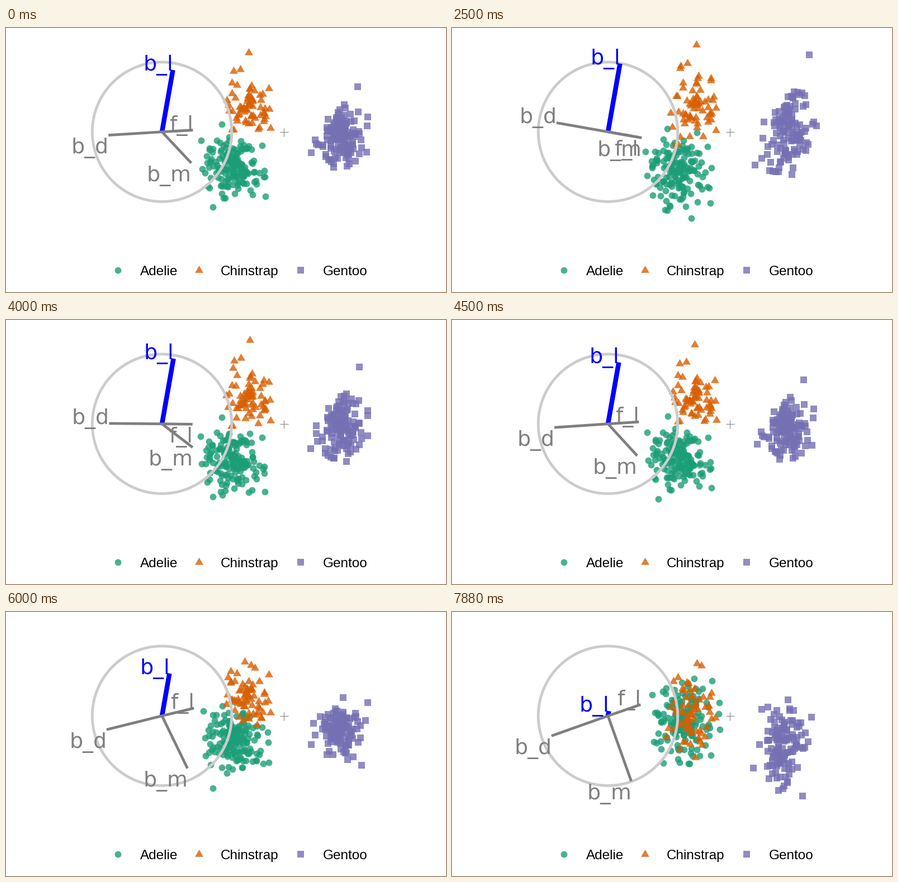
Animation of 787 by 472 pixels, one loop 8 s. Source, as a matplotlib script:

```python
import numpy as np
import matplotlib.pyplot as plt
from matplotlib.animation import FuncAnimation

W, H, DPI = 787, 472, 64
PX = 72 / DPI               # points per pixel
LOOP, STEP = 8000, 20       # ms
GREY = "#7f7f7f"

# Standardised bill length, bill depth, flipper length and body mass:
# a cloud around the mean, sharing one correlation, plus two far birds
SPREAD = np.array([.54, .56, .47, .57])
SPECIES = [
    dict(name="Adelie", marker="o", size=11.8, color="#1b9e77",
         n=149, corr=.45, mean=[-.94, .61, -.78, -.62],
         far=[[-2.17, -.84, -.92, -1.44], [-1.71, 2, -.21, .25]],
         key_x=200, text_x=239.5),
    dict(name="Chinstrap", marker=(3, 0, 0), size=17.2, color="#d95f02",
         n=66, corr=.57, mean=[.90, .64, -.36, -.58],
         far=[[2.58, .33, -1.42, -.63], [.55, -.28, -.63, -1.87]],
         key_x=345, text_x=384),
    dict(name="Gentoo", marker="s", size=11.4, color="#7570b3",
         n=121, corr=.68, mean=[.66, -1.10, 1.16, 1.09],
         far=[[2.87, -.08, 2.07, 2.30], [.97, -.99, 1.43, 2.62]],
         key_x=527.2, text_x=567),
]
AXES = ["b_l", "b_d", "f_l", "b_m"]
HUB, RADIUS = np.array([279, 185.7]), 124
ORIGIN, SCALE = np.array([480.6, 207.4]), np.array([61.6, -64.7])

# Radial tour: bill length turns out of the plane along one direction
PHI = np.radians(80)
ALONG = np.array([np.cos(PHI), np.sin(PHI)])
ACROSS = np.array([np.sin(PHI), -np.cos(PHI)])
FIXED = np.array([0, -.753, .435, .494])
TURNED = np.array([0, -.427, .242, -.871])
LEAD = np.array([1, 0, 0, 0])

# Down to zero in three even turns, a rest, then up by .15 rad at a time
STARTS = [0, *range(1500, 3000, 500), *range(3500, 8000, 500), 7880]
ANGLES = np.r_[np.linspace(.438, 0, 4), .15 * np.arange(1, 11)]


def sample(rng, n, corr, mean, far):
    """Birds of one species; a shared factor gives the correlation."""
    shared, own = rng.normal(size=(n, 1)), rng.normal(size=(n, 4))
    g = np.sqrt(corr) * shared + np.sqrt(1 - corr) * own
    g = np.clip(g - g.mean(0), -2.1, 2.1)
    return np.vstack([mean + g * SPREAD, far])


def basis(theta):
    """4 x 2 projection matrix for a given turn."""
    along = np.cos(theta) * LEAD + np.sin(theta) * TURNED
    return np.outer(FIXED, ACROSS) + np.outer(along, ALONG)


fig = plt.figure(figsize=(W / DPI, H / DPI), dpi=DPI, facecolor="white")
ax = fig.add_axes([0, 0, 1, 1])
ax.set(xlim=(0, W), ylim=(H, 0))
ax.axis("off")

rng = np.random.default_rng(7)
clouds = []
for s in SPECIES:
    style = dict(ls="", marker=s["marker"], ms=s["size"] * PX,
                 mfc=s["color"], mew=0, alpha=.8)
    birds = sample(rng, s["n"], s["corr"], s["mean"], s["far"])
    clouds.append((birds, ax.plot([], [], zorder=2, **style)[0]))
    ax.plot(s["key_x"], 432.6, **style)
    ax.text(s["text_x"], 442, s["name"], family="Liberation Sans",
            size=24.3 * PX, va="baseline", color="black")

ax.plot(496.6, 185.7, "+", ms=15 * PX, mew=1.4 * PX, color="#999999", zorder=1)
ring = np.linspace(0, 2 * np.pi, 200)
ax.plot(HUB[0] + 124.7 * np.cos(ring), HUB[1] + 124.7 * np.sin(ring),
        color="#cccccc", lw=4.8 * PX, zorder=3)

arms, labels = [], []
for name in AXES:
    color, width = ("blue", 8.5) if name == "b_l" else (GREY, 4.8)
    arms += ax.plot([], [], color=color, lw=width * PX,
                    solid_capstyle="butt", zorder=4)
    labels.append(ax.text(0, 0, name, family="DejaVu Sans", size=37.9 * PX,
                          color=color, ha="right", va="baseline", zorder=5))


def update(frame):
    step = np.searchsorted(STARTS, frame * STEP, side="right") - 1
    b = basis(ANGLES[step])
    for birds, dots in clouds:
        dots.set_data(*(ORIGIN + birds @ b * SCALE).T)
    for (dx, dy), arm, label in zip(b * RADIUS, arms, labels):
        x, y = HUB[0] + dx, HUB[1] - dy
        arm.set_data([HUB[0], x], [HUB[1], y])
        # Labels sit above the arm's end in the upper half, below it otherwise
        label.set_position((x + .5, y + 1 if dy >= 0 else y + 32.5))
    return [dots for _, dots in clouds] + arms + labels


anim = FuncAnimation(fig, update, frames=LOOP // STEP, interval=STEP,
                     repeat=True, repeat_delay=0)
plt.show()
```
